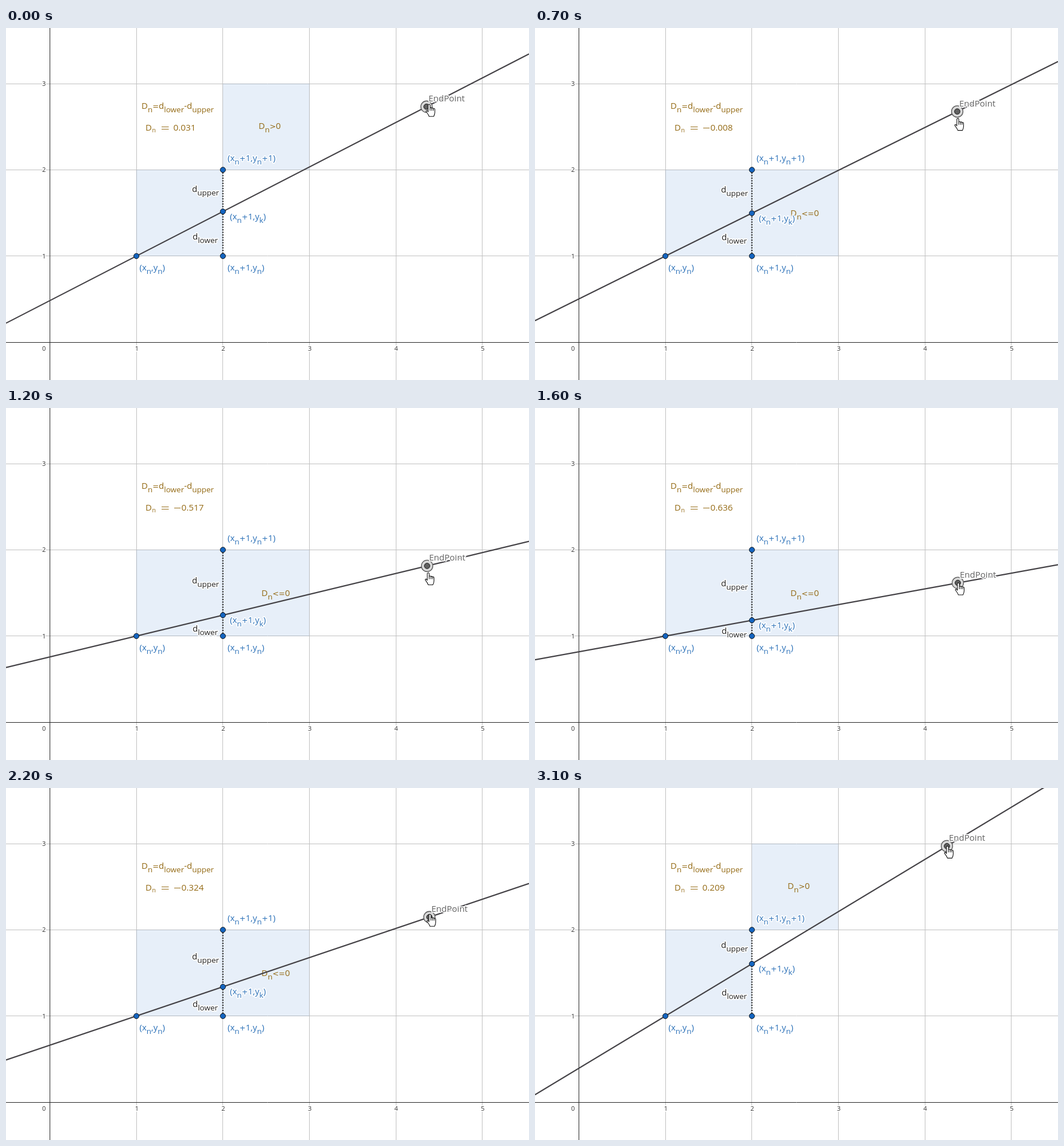
An HTML page with a canvas for the animation above (3800 ms loop, 911x614 px).

```html
<!DOCTYPE html>
<html lang="en">
<head>
<meta charset="utf-8">
<title>Midpoint decision on a line</title>
<style>
html, body { margin: 0; width: 100%; height: 100%; overflow: hidden; background: #fff; }
canvas { display: block; }
</style>
</head>
<body>
<canvas id="stage" width="911" height="614"></canvas>
<script>
const W = 911, H = 614, LOOP = 3800, STEP = 100;
const BLUE = '#2a70b8', BROWN = '#946a14', DARK = '#222';
const ctx = document.getElementById('stage').getContext('2d');

// time, end point x, decision value, pointer offset x and y
const KEYS = [
  [0, 732.5, 0.031, 4.5, -4],
  [600, 734, 0.026, 3, 5],
  [700, 735.5, -0.008, 1, 12],
  [1200, 733.5, -0.517, 2, 12],
  [1600, 736.5, -0.636, 1, 0],
  [1900, 736.5, -0.636, 1, 0],
  [2200, 737.5, -0.324, 1, -5],
  [2500, 726.5, 0.07, 0, -4],
  [2800, 717.5, 0.212, 0.5, 0],
  [2900, 717.5, 0.212, 0.5, 0],
  [3100, 717.5, 0.209, 1, 0],
  [3800, 717.5, 0.209, 1, 0]
];

const X = v => 76.5 + 150.65 * v;
const Y = v => 548.2 - 150.4 * v;
const crisp = v => Math.floor(v) + 0.5;

const HAND = new Path2D('M-1.7 13V1.6Q-1.7 0 0 0T1.7 1.6V7Q1.7 5.6 3.2 5.6T4.7 7.2' +
  'Q4.9 6.2 6.2 6.2T7.5 7.8Q7.8 7 9 7.2T10 9V14Q10 17 8 21H0Q-1 18 -4.5 13.5' +
  'Q-6 11.5 -4.5 11T-1.7 13ZM1.7 7V11M4.7 7.2V11M7.5 7.8V11');

// Monotone cubic interpolation of one key column
function sample(col, t) {
  let i = 0;
  while (i < KEYS.length - 2 && t >= KEYS[i + 1][0]) i++;
  const rate = k => KEYS[k + 1] && k >= 0
    ? (KEYS[k + 1][col] - KEYS[k][col]) / (KEYS[k + 1][0] - KEYS[k][0]) : 0;
  const tangent = k => {
    const a = rate(k - 1), b = rate(k);
    return a * b > 0 ? 2 * a * b / (a + b) : 0;
  };
  const [t0, t1] = [KEYS[i][0], KEYS[i + 1][0]];
  const h = t1 - t0, u = (t - t0) / h, w = 1 - u;
  return (1 + 2 * u) * w * w * KEYS[i][col] + u * w * w * h * tangent(i) +
    u * u * (3 - 2 * u) * KEYS[i + 1][col] - u * u * w * h * tangent(i + 1);
}

function line(x1, y1, x2, y2, color, width = 1) {
  ctx.strokeStyle = color;
  ctx.lineWidth = width;
  ctx.beginPath();
  ctx.moveTo(x1, y1);
  ctx.lineTo(x2, y2);
  ctx.stroke();
}

function disc(x, y, r, fill, stroke, width = 1) {
  ctx.beginPath();
  ctx.arc(x, y, r, 0, 7);
  ctx.fillStyle = fill;
  ctx.fill();
  ctx.strokeStyle = stroke;
  ctx.lineWidth = width;
  ctx.stroke();
}

// Writes text; _x or _{xyz} is a subscript, operators use a wider face
function label(text, x, y, color, halo = true, size = 15) {
  const runs = [];
  for (const [part] of text.matchAll(/_\{\w+\}|_\w|[+=<>]+|[^_+=<>]+/g)) {
    const sub = part[0] === '_';
    ctx.font = /[+=<>]/.test(part) ? '13px "DejaVu Sans", sans-serif'
      : `${sub ? size * 0.9 : size}px "Open Sans", "Noto Sans", sans-serif`;
    const run = { font: ctx.font, s: part.replace(/[_{}]/g, ''), x, y: sub ? y + 6 : y };
    x += ctx.measureText(run.s).width;
    runs.push(run);
  }
  ctx.strokeStyle = '#fff';
  ctx.lineWidth = 3.5;
  ctx.lineJoin = 'round';
  if (halo) for (const r of runs) {
    ctx.font = r.font;
    ctx.strokeText(r.s, r.x, r.y);
  }
  ctx.fillStyle = color;
  for (const r of runs) {
    ctx.font = r.font;
    ctx.fillText(r.s, r.x, r.y);
  }
}

function drawGrid() {
  for (let v = 1; v < 6; v++) line(crisp(X(v)), 0, crisp(X(v)), H, '#c0c0c0');
  for (let v = 1; v < 4; v++) line(0, crisp(Y(v)), W, crisp(Y(v)), '#c0c0c0');
  line(76.5, 0, 76.5, H, DARK);
  line(0, 548.5, W, 548.5, DARK);
  for (let v = 1; v < 6; v++) label(`${v}`, X(v) - 2.5, 563, '#333', true, 11);
  for (let v = 1; v < 4; v++) label(`${v}`, 63, Y(v) + 4, '#333', true, 11);
  label('0', 63, 563, '#333', true, 11);
}

function drawCells(up) {
  ctx.fillStyle = 'rgba(21,101,192,0.1)';
  const cell = (x, y) => ctx.fillRect(X(x), Y(y + 1), X(1) - X(0), Y(0) - Y(1));
  cell(1, 1);
  cell(2, up ? 2 : 1);
}

function drawValue(d) {
  label('D_{n}=d_{lower}-d_{upper}', 236, 140.5, BROWN, false);
  label('D', 243, 179, BROWN, false);
  label('n', 254.5, 182, BROWN, false, 10.5);
  line(271, 172.5, 283.5, 172.5, BROWN);
  line(271, 176.5, 283.5, 176.5, BROWN);
  if (d < 0) line(293, 174.5, 304, 174.5, BROWN);
  label(`${Math.abs(+d.toFixed(3))}`, d < 0 ? 305.5 : 291.5, 179, BROWN, false, 15.3);
}

function draw(t) {
  const [x, d, dx, dy] = [1, 2, 3, 4].map(col => sample(col, t));
  const slope = (1 + d) / 2;
  const lineY = px => 397.7 - (px - 227.3) * slope;
  const x1 = X(1), x2 = X(2), top = Y(2), base = Y(1), yk = lineY(x2), y = lineY(x);

  ctx.fillStyle = '#fff';
  ctx.fillRect(0, 0, W, H);
  drawGrid();
  drawCells(d > 0);
  drawValue(d);
  if (d > 0) label('D_n>0', 440, 175.5, BROWN, false);
  else label('D_n<=0', 445, 327.5, BROWN, false);

  line(0, lineY(0), W, lineY(W), '#444246', 2.2);
  ctx.setLineDash([2.2, 2.3]);
  line(x2, top, x2, base, '#333', 2.4);
  ctx.setLineDash([]);

  for (const [px, py] of [[x1, base], [x2, base], [x2, top], [x2, yk]])
    disc(px, py, 4.6, '#1565c0', '#111');
  disc(x, y, 10, '#d9d9d9', '#555', 1.3);
  disc(x, y, 4.8, '#616161', '#111');

  label('d_{upper}', 324, (top + yk) / 2 + 2, DARK);
  label('d_{lower}', 325, (base + yk) / 2 + 10, DARK);
  label('(x_n,y_n)', 232.5, 423, BLUE);
  label('(x_n+1,y_n)', 386, 423, BLUE);
  label('(x_n+1,y_n+1)', 386, 231.5, BLUE);
  label('(x_n+1,y_k)', 390, yk + 13.5, BLUE);
  label('EndPoint', x + 3.5, y - 9, '#616161');

  ctx.save();
  ctx.translate(x + dx, y + dy);
  ctx.fillStyle = '#fff';
  ctx.fill(HAND);
  ctx.strokeStyle = '#111';
  ctx.lineWidth = 1.1;
  ctx.stroke(HAND);
  ctx.restore();
}

const start = performance.now();
function tick() {
  const t = (performance.now() - start) % LOOP;
  draw(Math.floor(t / STEP) * STEP);
  requestAnimationFrame(tick);
}
tick();
</script>
</body>
</html>
```
